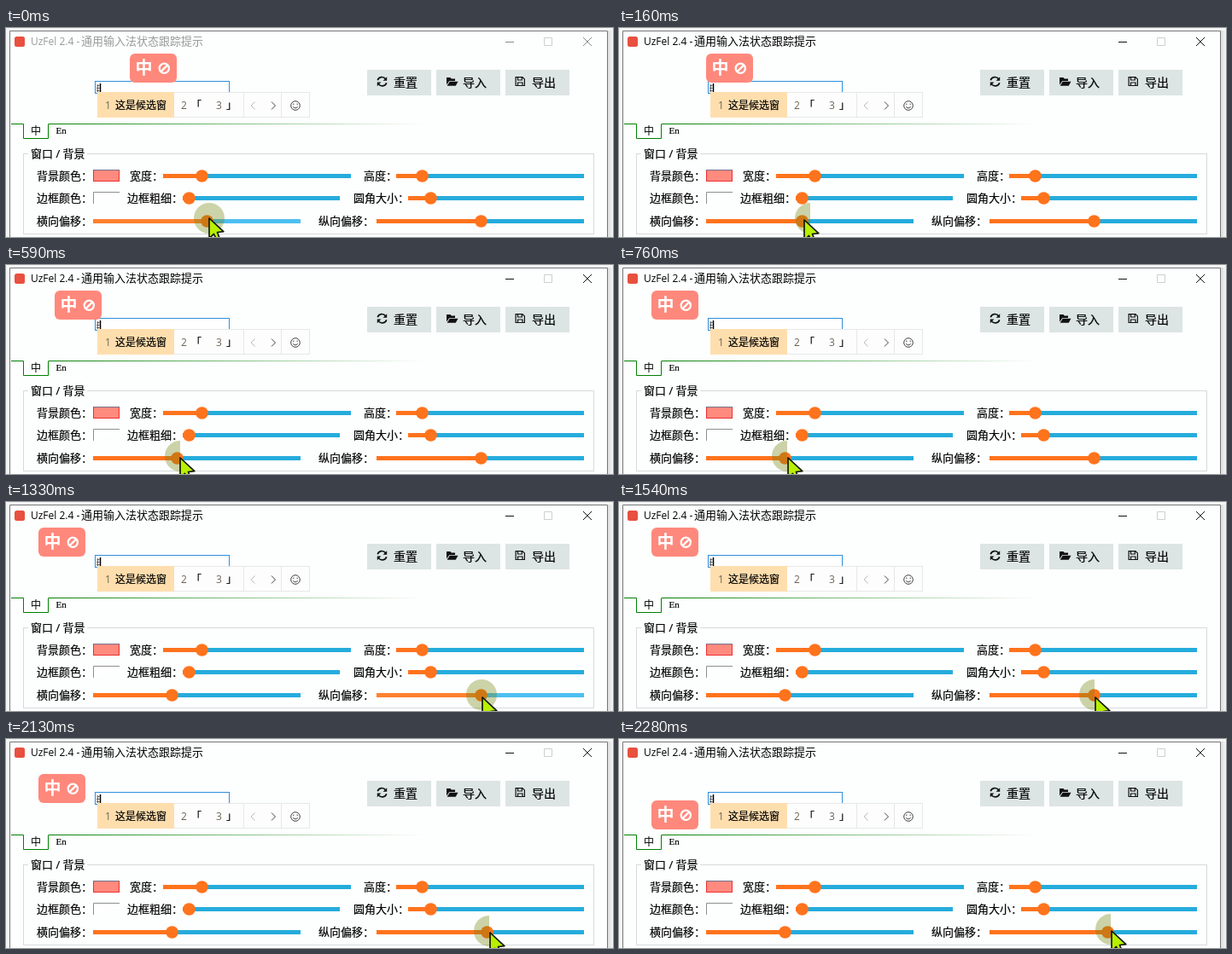
Write an HTML page that moves like this. It is 711 by 245 pixels and loops after 2330 ms.

```html
<!DOCTYPE html>
<html lang="zh-CN">
<head>
<meta charset="utf-8">
<title>输入法状态提示</title>
<style>
html, body { margin: 0; width: 100%; height: 100%; overflow: hidden; background: #f4f5f5; }
svg { display: block; width: 711px; height: 245px; }
text { font: 13px "Open Sans", "Noto Sans CJK SC", "Noto Sans CJK", sans-serif; fill: #000; white-space: pre; }
.small { font-size: 12px; }
.line { fill: none; stroke-width: 1; }
#fields text, #buttons text, #candidates .word { stroke: #000; stroke-width: .2; }
</style>
</head>
<body>
<svg viewBox="0 0 711 245" xmlns="http://www.w3.org/2000/svg">
  <defs>
    <linearGradient id="fade">
      <stop offset="0" stop-color="#008000"/>
      <stop offset="1" stop-color="#fff"/>
    </linearGradient>
    <linearGradient id="shade">
      <stop offset="0" stop-color="#dcdddd"/>
      <stop offset="1" stop-color="#f4f5f5"/>
    </linearGradient>
  </defs>
  <rect x="705" y="3" width="6" height="242" fill="url(#shade)"/>
  <path d="M4.500 246V3.500H704.500V246" fill="#fdfefe" stroke="#757879"/>

  <rect x="10" y="10" width="12" height="12" rx="2.500" fill="#e8503f"/>
  <g id="title">
    <text x="29" y="20" class="small">UzFel 2.4 - </text>
    <text x="88" y="20">通用输入法状态跟踪提示</text>
  </g>
  <path d="M630.500 11.500h9v9h-9z" class="line" stroke="#cfcfcf"/>
  <path id="controls" d="M585 16.500h10M676 11l10 10M686 11l-10 10" class="line"/>

  <g id="buttons"></g>
  <g fill="none" stroke="#111" stroke-width="1.700">
    <path d="M435.300 61.200a5.200 5.200 0 0 1 9.300-1.400M445.700 64.200a5.200 5.200 0 0 1-9.300 1.400"/>
    <g fill="#111" stroke="none">
      <path d="M446.200 57.200v4.600h-4.600zM434.800 68.200v-4.600h4.600z"/>
      <path d="M516 66.500v-8.500h4.500l1.200 1.600h4.300v2.400h-6.600z"/>
      <path d="M519.800 62.800h9.700l-2.800 5h-10z"/>
    </g>
    <path d="M597.100 57.600h7.800l2.500 2.500v7.400h-10.300zM599.500 58v3h4.800v-3M599.500 67v-3h5.500v3" stroke-width="1.200"/>
  </g>

  <rect x="104.500" y="62.500" width="157" height="14" fill="#fff" stroke="#2f8fdc"/>
  <path d="M106.500 67.500h3M106 70.500h3.500M106 73.500h3.500M107.500 66v9" class="line" stroke="#666"/>
  <path d="M110.500 65v10" stroke="#000" stroke-width="1.500"/>

  <rect x="107.500" y="75.500" width="248" height="29" fill="#fdfdfd" stroke="#e6e8e8"/>
  <rect x="107" y="75" width="90" height="30" fill="#ffdeae"/>
  <path d="M278.500 76v28M322.500 76v28" class="line" stroke="#e6e8e8"/>
  <g id="candidates"></g>
  <path d="M291.500 86.500l-4.500 4.500 4.500 4.500" class="line" stroke="#bbb"/>
  <path d="M311 86.500l4.500 4.500-4.500 4.500" class="line" stroke="#444"/>
  <g class="line" stroke="#444">
    <circle cx="339" cy="91" r="5.300"/>
    <path d="M336.200 92.500q2.800 3 5.600 0M336.800 88.500v1.500M341.200 88.500v1.500"/>
  </g>

  <path d="M6 112.500H20.500V129.500H49.500V112.500" class="line" stroke="#008000"/>
  <rect x="50" y="112" width="442" height="1" fill="url(#fade)"/>
  <text x="29" y="125" class="small">中</text>
  <text x="58.500" y="124" style="font:11px 'Liberation Serif',serif;stroke:#000;stroke-width:.2">En</text>

  <rect x="20.500" y="147.500" width="668" height="94" class="line" stroke="#d6dadc"/>
  <rect x="26" y="141" width="69" height="13" fill="#fdfefe"/>

  <rect x="102.500" y="166.500" width="30" height="13" fill="#ff8a7e" stroke="#ec3030"/>
  <path d="M102 166.500h31" class="line" stroke="#75708c"/>
  <path d="M102.500 206V192.500H133" fill="#fff" stroke="#8c8f90"/>
  <g id="fields">
    <text x="29" y="151.500">窗口 / 背景</text>
    <text x="36" y="177.500">背景颜色：</text>
    <text x="36" y="203.500">边框颜色：</text>
  </g>

  <g id="badge">
    <rect width="55" height="34" rx="6" fill="#ff887c"/>
    <text x="6.500" y="24" style="font-size:20px;font-weight:700;fill:#fff">中</text>
    <g fill="none" stroke="#fff" stroke-width="2.300">
      <circle cx="40.300" cy="17.300" r="5.600"/>
      <path d="M36.400 21.200l7.800-7.800"/>
    </g>
  </g>

  <path id="halo" fill="rgba(112,129,6,.35)"/>
  <path id="arrow" d="M0 0V23.500L5.500 18.500L9.500 27L13 25.500L9.500 16.500L16.800 15.700Z" fill="#b8f000" stroke="#14180a" stroke-width="1.700" stroke-linejoin="round"/>
</svg>
<script>
const NS = "http://www.w3.org/2000/svg";
const LOOP = 2330;
const PRESS_X = 50, HOVER_Y = 1330, PRESS_Y = 1540;
const $ = id => document.getElementById(id);

function set(el, attrs) {
  for (const key in attrs) el.setAttribute(key, attrs[key]);
}

function add(parent, tag, attrs, content = "") {
  const el = document.createElementNS(NS, tag);
  set(el, attrs);
  el.textContent = content;
  return parent.appendChild(el);
}

["重置", "导入", "导出"].forEach((name, i) => {
  const x = 423 + 81 * i;
  add($("buttons"), "rect", { x, y: 49, width: 75, height: 30, fill: "#dce5e4" });
  add($("buttons"), "text", { x: x + 31, y: 69, style: "font-size:14px" }, name);
});

["这是候选窗", "「", "」"].forEach((word, i) => {
  const x = i ? 164 + 41 * i : 116;
  add($("candidates"), "text", { x, y: 95, class: "small", style: "fill:#6e6455" }, i + 1);
  add($("candidates"), "text", { x: x + 12, y: 95, class: "small word" }, word);
});

function addSlider(label, labelX, row, left, right, value) {
  const g = $("fields");
  const y = Math.round(173 + 26.4 * row);
  add(g, "text", { x: labelX, y: y + 4.5 }, label);
  const rest = add(g, "rect", { x: left, y: y - 2, width: right - left, height: 5 });
  const done = add(g, "rect", { x: left, y: y - 2, height: 5 });
  const knob = add(g, "circle", { cy: y + 0.5, r: 7.3, fill: "#ff731c" });
  const update = (x, hover) => {
    set(rest, { fill: hover ? "#4dbff2" : "#25acdc" });
    set(done, { width: x - left, fill: hover ? "#ff8130" : "#ff731c" });
    set(knob, { cx: x + 0.5 });
  };
  update(value, false);
  return update;
}

addSlider("宽度：", 145, 0, 184, 404, 229);
addSlider("高度：", 419, 0, 457, 677, 487);
addSlider("边框粗细：", 142, 1, 207, 391, 214);
addSlider("圆角大小：", 407, 1, 471, 677, 497);
const moveX = addSlider("横向偏移：", 36, 2, 102, 345, 235);
const moveY = addSlider("纵向偏移：", 366, 2, 434, 677, 556);

const lerp = ([a, b], k) => a + (b - a) * k;
const ramp = (t, a, b) => Math.min(1, Math.max(0, (t - a) / (b - a)));
const easeOut = (u, power) => 1 - (1 - u) ** power;

// a quick pull, a pause, then a short nudge
const pullX = t => 0.8 * easeOut(ramp(t, PRESS_X, 430), 3) + 0.2 * ramp(t, 540, 730);
const pullY = t => easeOut(ramp(t, 2002, 2260), 2);

const dragX = { pull: pullX, trail: 50, knob: [235, 194], badge: [145, 38],
  haloX: [238, 196], haloY: [223, 224], tipX: [238, 198], tipY: [223, 226] };
const dragY = { pull: pullY, trail: 0, knob: [556, 572], badge: [30, 72],
  haloX: [557, 576], haloY: [226, 223], tipX: [558, 577], tipY: [229, 225] };

// moments at which the screen refreshes
const ticks = [0, PRESS_X, 105, 160, 240, 300, 365, 430, 590, 650, 760,
  HOVER_Y, PRESS_Y, 2020, 2070, 2150, 2210, 2280];

function draw(time) {
  const t = ticks.filter(tick => tick <= time).pop();
  const vertical = t >= HOVER_Y;
  const drag = vertical ? dragY : dragX;
  const pressed = t >= (vertical ? PRESS_Y : PRESS_X);
  const at = (part, lag = 0) => Math.round(lerp(drag[part], drag.pull(t - lag)));

  moveX(vertical ? dragX.knob[1] : at("knob"), !vertical && !pressed);
  moveY(vertical ? at("knob") : dragY.knob[0], vertical && !pressed);

  const offset = at("badge", 30);
  const [x, y] = vertical ? [dragX.badge[1], offset] : [offset, dragY.badge[0]];
  set($("badge"), { transform: `translate(${x} ${y})` });

  // only the left half remains while the button is down
  const hx = at("haloX", drag.trail), hy = at("haloY", drag.trail);
  const top = `${hx} ${hy - 18}`;
  const left = `M${top}A18 18 0 0 0 ${hx} ${hy + 18}`;
  set($("halo"), { d: pressed ? left + "Z" : `${left}A18 18 0 0 0 ${top}Z` });
  set($("arrow"), { transform: `translate(${at("tipX")} ${at("tipY")})` });

  const active = t >= PRESS_X;
  for (const el of $("title").children) el.style.fill = active ? "#000" : "#999";
  set($("controls"), { stroke: active ? "#111" : "#888" });
}

const begin = performance.now();
function tick() {
  draw(Math.max(0, performance.now() - begin) % LOOP);
  requestAnimationFrame(tick);
}
tick();
</script>
</body>
</html>
```
